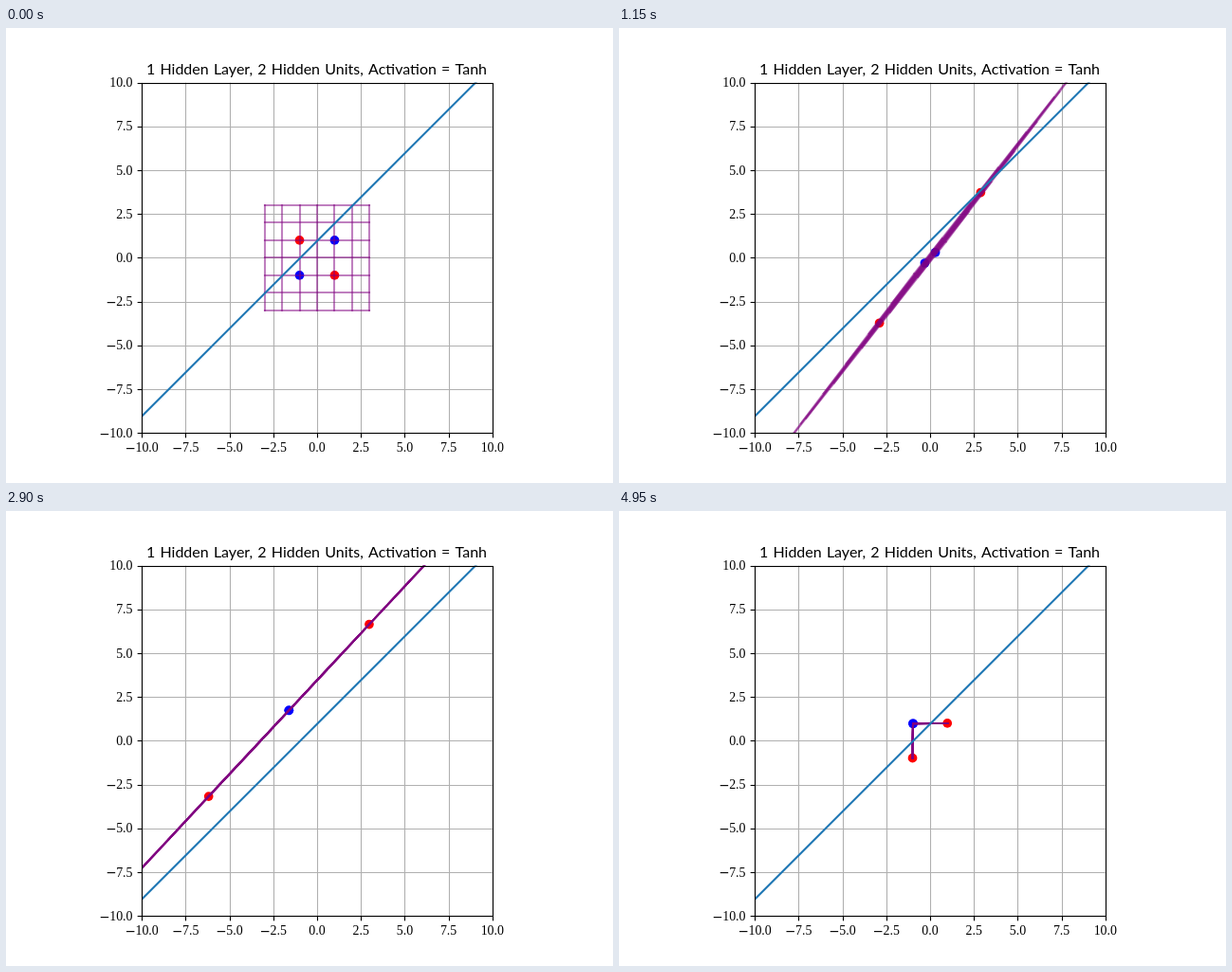
An HTML page with a canvas that plays this animation: 640x480 px, repeating every 5 s.

```html
<!DOCTYPE html>
<html lang="en">
<head>
<meta charset="utf-8">
<title>Hidden layer transform</title>
<style>
  html, body { margin: 0; width: 100%; height: 100%; overflow: hidden; background: #fff; }
  canvas { display: block; }
</style>
</head>
<body>
<canvas id="plot" width="640" height="480"></canvas>
<script>
const ctx = document.getElementById('plot').getContext('2d');

const CX = 328, CY = 242.4, UNIT = 18.48;
const LEFT = 143.2, TOP = 57.6, SIZE = 369.6;
const THIN = 1.11, THICK = 2.08;
const STEP_MS = 50, STEPS = 100, STAGE = 33;

// Layer parameters: z = W p + b, then tanh(z)
const W = [[-2.29, 2.29], [-2.455, 2.455]];
const B = [-2.12, 2.29];

const TICKS = Array.from({ length: 9 }, (_, i) => -10 + 2.5 * i);
const RANGE = [-3, -2, -1, 0, 1, 2, 3];
const DOTS = [[-1, 1, '#f00'], [1, -1, '#f00'], [1, 1, '#00f'], [-1, -1, '#00f']];

const px = x => CX + x * UNIT;
const py = y => CY - y * UNIT;
const snap = v => Math.floor(v + 0.5) + 0.5;
const clamp = v => Math.min(1, Math.max(0, v));
const mix = (a, b, s) => a + (b - a) * s;

// Linear map, then shift, then activation, one stage after the other
function transform(x, y, step) {
  const [lin, shift, act] = [0, 1, 2].map(i => clamp(step / STAGE - i));
  const p = [x, y];
  return p.map((v, i) => {
    const z = mix(v, W[i][0] * x + W[i][1] * y, lin) + shift * B[i];
    return mix(z, Math.tanh(z), act);
  });
}

function stroke(points, color, width, cap = 'butt') {
  ctx.strokeStyle = color;
  ctx.lineWidth = width;
  ctx.lineCap = cap;
  ctx.lineJoin = 'round';
  ctx.beginPath();
  points.forEach(([x, y]) => ctx.lineTo(x, y));
  ctx.stroke();
}

function drawDots(step) {
  for (const [x, y, color] of DOTS) {
    const [u, v] = transform(x, y, step);
    ctx.fillStyle = color;
    ctx.beginPath();
    ctx.arc(px(u), py(v), 4.86, 0, 2 * Math.PI);
    ctx.fill();
  }
}

function drawGrid() {
  for (const t of TICKS) {
    const x = snap(px(t)), y = snap(py(t));
    stroke([[x, TOP], [x, TOP + SIZE]], '#b0b0b0', THIN);
    stroke([[LEFT, y], [LEFT + SIZE, y]], '#b0b0b0', THIN);
  }
}

function drawMesh(step) {
  const place = (x, y) => {
    const [u, v] = transform(x, y, step);
    const p = [px(u), py(v)];
    return step === 0 ? p.map(Math.round) : p;
  };
  const color = 'rgba(128, 0, 128, 0.5)';
  for (const a of RANGE) {
    stroke(RANGE.map(b => place(b, a)), color, THICK, 'square');
    stroke(RANGE.map(b => place(a, b)), color, THICK, 'square');
  }
}

function drawNumber(value, right, base) {
  const font = '13.9px "Liberation Serif", serif';
  const digits = Math.abs(value).toFixed(1);
  ctx.font = font;
  ctx.textAlign = 'right';
  const width = ctx.measureText(digits).width;
  const sign = value < 0 ? 10.8 : 0;
  if (right === null) right = px(value) + (width + sign) / 2;
  ctx.fillText(digits, right, base);
  if (sign) {
    ctx.font = '13.5px "DejaVu Sans", sans-serif';
    ctx.fillText('\u2212', right - width + 0.3, base + 0.8);
  }
}

function drawAxes() {
  const x0 = snap(LEFT), x1 = snap(LEFT + SIZE);
  const y0 = snap(TOP), y1 = snap(TOP + SIZE);
  ctx.lineWidth = THIN;
  ctx.strokeStyle = '#000';
  ctx.lineJoin = 'miter';
  ctx.strokeRect(x0, y0, x1 - x0, y1 - y0);

  ctx.fillStyle = '#000';
  for (const t of TICKS) {
    const x = snap(px(t)), y = snap(py(t));
    stroke([[x, y1], [x, y1 + 4.86]], '#000', THIN);
    stroke([[x0, y], [x0 - 4.86, y]], '#000', THIN);
    drawNumber(t, null, 447);
    drawNumber(t, 133.5, py(t) + 4.6);
  }

  ctx.font = '16px Lato, sans-serif';
  ctx.textAlign = 'center';
  ctx.wordSpacing = '1.1px';
  ctx.fillText('1 Hidden Layer, 2 Hidden Units, Activation = Tanh', 327.5, 48.5);
  ctx.wordSpacing = '0px';
}

function draw(step) {
  ctx.fillStyle = '#fff';
  ctx.fillRect(0, 0, 640, 480);
  ctx.save();
  ctx.beginPath();
  ctx.rect(LEFT, TOP, SIZE, SIZE);
  ctx.clip();
  drawDots(step);
  drawGrid();
  drawMesh(step);
  stroke([[px(-11), py(-10.04)], [px(11), py(11.96)]], '#1f77b4', THICK);
  ctx.restore();
  drawAxes();
}

function tick(now) {
  draw(Math.floor(now / STEP_MS) % STEPS);
  requestAnimationFrame(tick);
}
draw(0);
requestAnimationFrame(tick);
</script>
</body>
</html>
```
